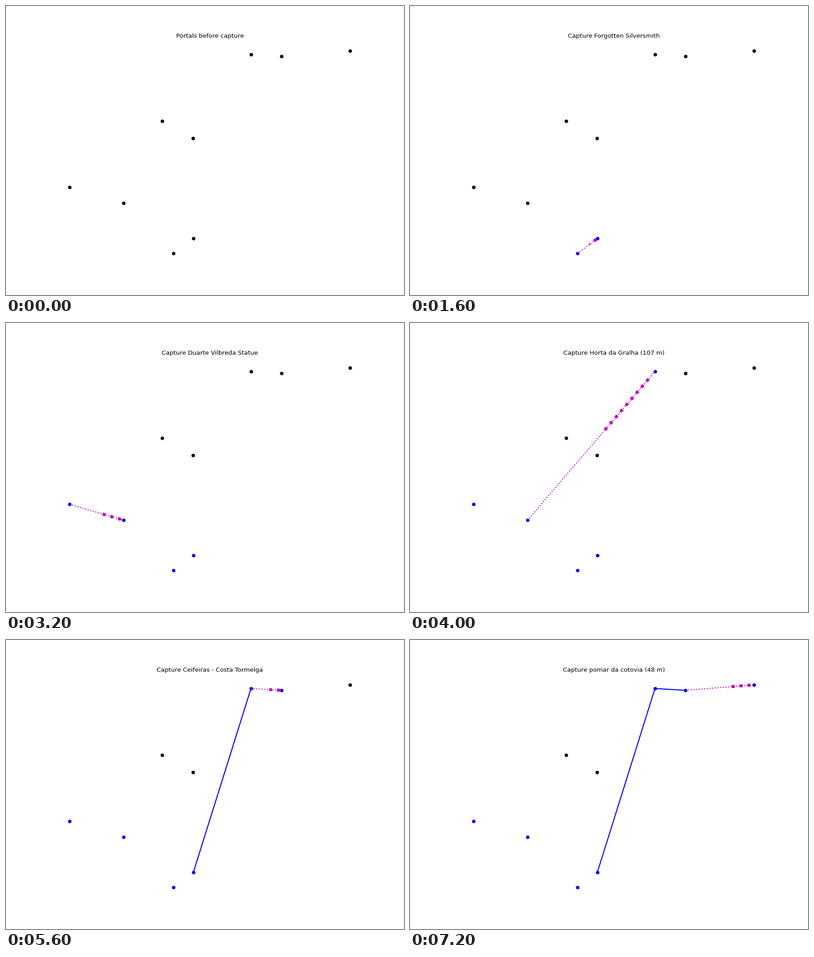
A matplotlib script that plays this animation: 877x638 px, repeating every 8 s.

```python
import matplotlib.pyplot as plt
import numpy as np
from matplotlib.animation import FuncAnimation

W, H, DPI = 877, 638, 80
STEP_MS = 800

PORTALS = np.array([
    (369.3, 545.9), (412.7, 513.3), (140.35, 400.3),
    (259.1, 435.3), (539.8, 107.1), (607.1, 111.1),
    (758.2, 98.9), (343.8, 254.2), (412.0, 292.3),
])

# Each step: title, action, portal left, portal reached.
STEPS = [
    ("Portals before capture", None, None, None),
    ("Capture Coreto Azul", "capture", None, 0),
    ("Capture Forgotten Silversmith", "capture", 0, 1),
    ("Capture Chafariz da Cegonha (89 m)", "capture", 1, 2),
    ("Capture Duarte Vilbreda Statue", "capture", 2, 3),
    ("Capture Horta da Gralha (107 m)", "capture", 3, 4),
    ("Link to Forgotten Silversmith", "link", 4, 1),
    ("Capture Ceifeiras - Costa Tormelga", "capture", 4, 5),
    ("Link to Horta da Gralha", "link", 5, 4),
    ("Capture pomar da cotovia (48 m)", "capture", 5, 6),
]

fig = plt.figure(figsize=(W / DPI, H / DPI), dpi=DPI, facecolor="white")
ax = fig.add_axes([0, 0, 1, 1])
ax.set_xlim(0, W)
ax.set_ylim(H, 0)
ax.axis("off")

title = ax.text(0.5125 * W, 0.12 * H - 6 * DPI / 72, "", fontsize=12,
                family="DejaVu Sans", ha="center", va="baseline")


def dots(color):
    return ax.plot([], [], "o", color=color, ms=6, mew=1, zorder=1)[0]


def stroke(color, width, zorder):
    return ax.plot([], [], color=color, lw=width, zorder=zorder)[0]


neutral, owned = dots("k"), dots("b")
links = stroke("b", 2, 2)
route, head = stroke("k", 2, 3), stroke("k", 6, 4)


def show(artist, points):
    artist.set_data(*np.reshape(points, (-1, 2)).T)


def draw(i):
    text, action, start, end = STEPS[i]
    title.set_text(text)

    taken = sum(step[1] == "capture" for step in STEPS[:i + 1])
    show(owned, PORTALS[:taken])
    show(neutral, PORTALS[taken:])

    gap = (np.nan, np.nan)
    show(links, [p for _, act, a, b in STEPS[:i] if act == "link"
                 for p in (PORTALS[a], PORTALS[b], gap)])

    if start is None:
        show(route, [])
        show(head, [])
    else:
        a, b = PORTALS[start], PORTALS[end]
        show(route, [a, b])
        # The thick part marks the direction of travel.
        show(head, [a + 0.95 * (b - a), a + 0.6 * (b - a)])
        for line in (route, head):
            line.set_color("k" if action == "link" else "m")
            line.set_linestyle("-" if action == "link" else ":")
    return title, neutral, owned, links, route, head


anim = FuncAnimation(fig, draw, frames=len(STEPS), interval=STEP_MS,
                     init_func=lambda: draw(0), repeat=True, repeat_delay=0)
plt.show()
```
